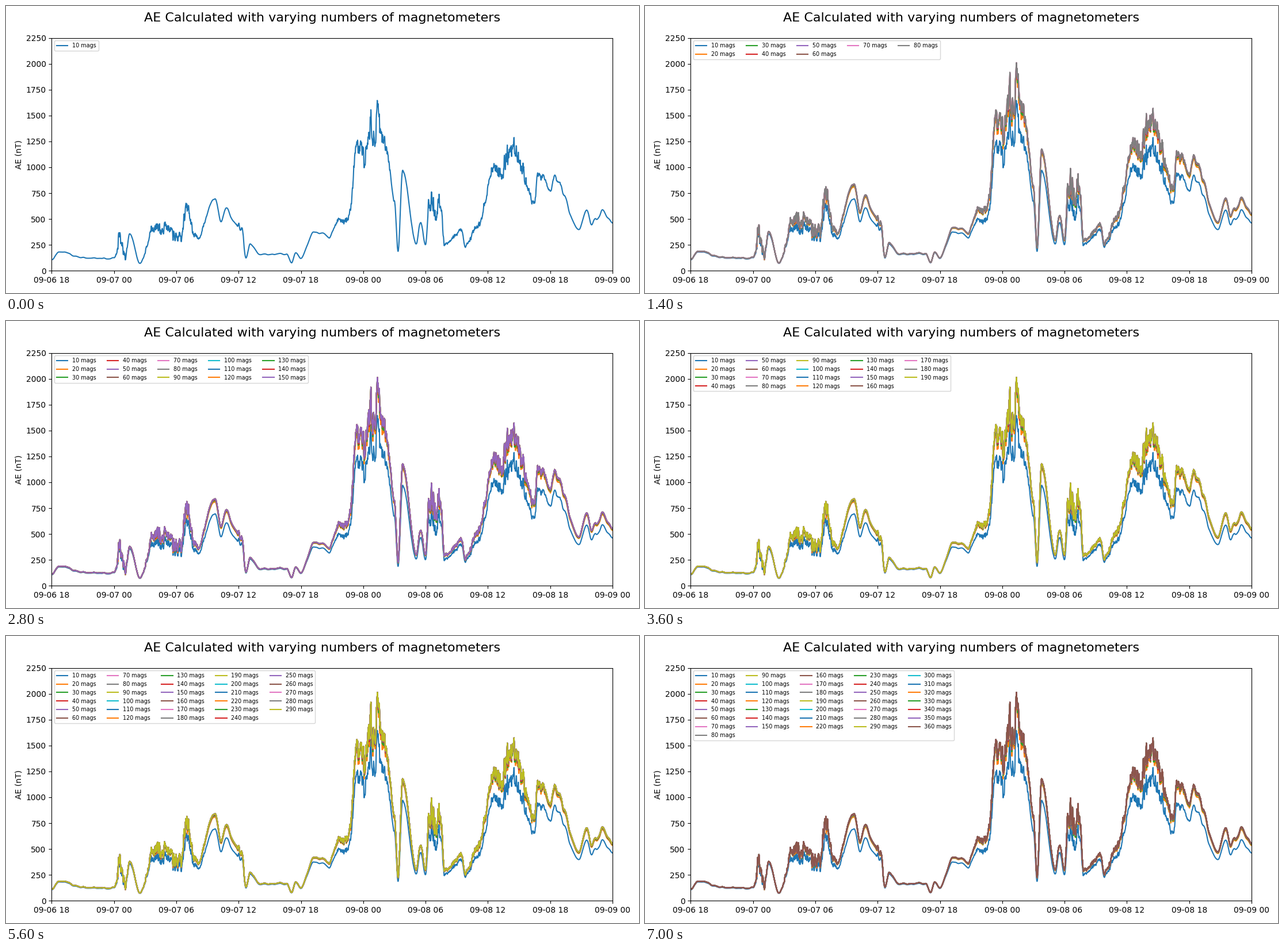
Animation, 1100 px wide and 500 px high, one loop 7.2 s. Source, as a matplotlib script:

```python
import numpy as np
import matplotlib.pyplot as plt
from matplotlib.animation import FuncAnimation

COUNT = 36
STEP_MS = 200
HOURS = 54

rng = np.random.default_rng(17)
t = np.linspace(0, HOURS, HOURS * 60 + 1)

# Turning points of the ten-station index, hour: nT
TURNS = {
    0: 105, 0.7: 190, 2.8: 128, 6: 120, 6.5: 250, 7.1: 140, 7.5: 365,
    8.5: 75, 9.9: 440, 12.5: 330, 12.95: 600, 13.9: 310, 15.7: 670,
    16.3: 480, 16.8: 590, 18.3: 385, 18.7: 130, 19.1: 260, 20: 155,
    22.6: 160, 23.1: 75, 23.5: 180, 24: 122, 25.2: 380, 26.8: 330,
    27.7: 500, 28.6: 515, 29.4: 1180, 30: 1130, 30.6: 1430, 31.8: 1430,
    33: 690, 33.35: 190, 33.8: 960, 35.1: 250, 35.5: 460, 36: 250,
    36.3: 650, 37.5: 650, 37.8: 260, 39.5: 390, 39.8: 240, 41.2: 470,
    42.4: 930, 44.7: 1180, 46.5: 660, 46.8: 930, 48: 760, 48.4: 900,
    50.8: 390, 51.5: 570, 52: 460, 53: 570, 54: 460}

# Spells of rapid fluctuation: centre, half width, relative strength
BURSTS = [(6.7, 0.5, 0.3), (11.6, 2.7, 0.11), (18.2, 0.4, 0.06),
          (30.2, 3, 0.055), (31, 1, 0.03), (36.9, 0.7, 0.13),
          (42, 6, 0.045), (44.2, 1.6, 0.03)]


def ease(u):
    u = np.clip(u, 0, 1)
    return u * u * (3 - 2 * u)


def smooth(y, width):
    reach = 3 * width
    kernel = np.exp(-0.5 * (np.arange(-reach, reach + 1) / width) ** 2)
    return np.convolve(np.pad(y, reach, mode="edge"), kernel / kernel.sum(), "valid")


def noise(*widths):
    """Bounded noise mixed from several time scales in minutes."""
    parts = [smooth(rng.standard_normal(t.size), w) for w in widths]
    mix = sum(p / p.std() for p in parts) / len(parts) ** 0.5
    return 1.8 * np.tanh(mix / 1.8)


def trend():
    hours, values = np.array(list(TURNS.items())).T
    i = np.clip(np.searchsorted(hours, t, side="right") - 1, 0, hours.size - 2)
    u = (t - hours[i]) / (hours[i + 1] - hours[i])
    return values[i] + (values[i + 1] - values[i]) * ease(u)


level = trend()
rough = level * sum(s * np.exp(-((t - c) / w) ** 4) for c, w, s in BURSTS)
low = level * (1 + 0.035 * noise(8)) + rough * noise(1, 3, 8)
low = np.maximum(low, 62)

# The full network reads higher when activity is strong
gain = 1.04 + 0.17 * ease((smooth(level, 30) - 150) / 400)
full = low * gain + 0.6 * rough * np.abs(noise(1, 3))


def series(k):
    """Index from 10 * (k + 1) stations, closing in on the full network."""
    if k == 0:
        return low
    gap = 0.2 * np.exp(-0.6 * (k - 1))
    return full - gap * (full - low) + gap * rough * noise(1, 3)


fig, ax = plt.subplots(figsize=(11, 5), dpi=100)
fig.suptitle("AE Calculated with varying numbers of magnetometers",
             fontsize=16, y=0.978)
ax.set_ylabel("AE (nT)")
ax.set_xlim(0, HOURS)
ax.set_ylim(0, 2250)
ax.set_yticks(range(0, 2251, 250))
ticks = range(0, HOURS + 1, 6)
ax.set_xticks(ticks, [f"09-{6 + (h + 18) // 24:02d} {(h + 18) % 24:02d}" for h in ticks])
fig.tight_layout()

lines = [ax.plot(t, series(k), color=f"C{k % 10}", label=f"{10 * (k + 1)} mags")[0]
         for k in range(COUNT)]


def draw(i):
    for k, line in enumerate(lines):
        line.set_visible(k <= i)
    ax.legend(handles=lines[:i + 1], loc="upper left", ncol=5, fontsize="x-small")
    return lines


anim = FuncAnimation(fig, draw, frames=COUNT, init_func=lambda: draw(0),
                     interval=STEP_MS, repeat=True, repeat_delay=0)
plt.show()
```
